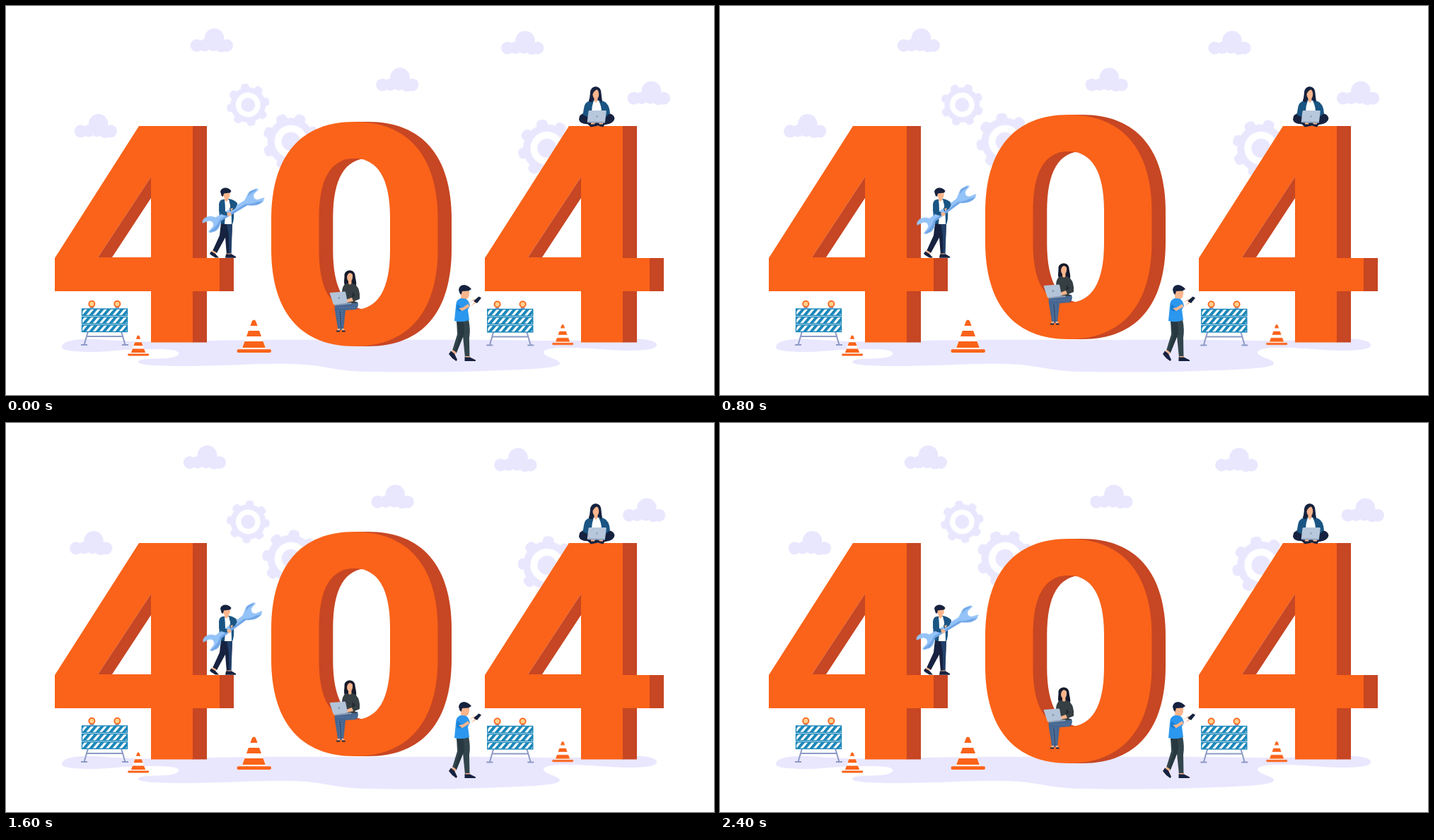
Animation, 1001 px wide and 551 px high, one loop 2.44 s. Source, as an HTML page without scripts:

```html
<!DOCTYPE html>
<html lang="en">
<head>
<meta charset="utf-8">
<title>404</title>
<style>
html, body { margin: 0; width: 100%; height: 100%; overflow: hidden; background: #fff; }
svg { display: block; width: 100%; height: 100%; }
.orange { fill: #fa6319; }
.rust { fill: #c74623; }
.pale { fill: #e9e7fe; }
.navy { fill: #16223f; }
.blue { fill: #1a5583; }
.skin { fill: #fbb58c; }
.white { fill: #fff; }
.move { animation: shift 2440ms linear infinite; }
.turn { animation: spin 2440ms linear infinite; }
.swing { animation: tilt 2440ms linear infinite; transform-origin: 309px 300px; }
@keyframes shift {
  0%, 98.36%, 100% { transform: none; }
  49.18% { transform: translate(var(--x, 0px), var(--y, 0px)); }
}
@keyframes spin {
  0% { transform: rotate(0deg); }
  98.36%, 100% { transform: rotate(var(--a)); }
}
@keyframes tilt {
  0%, 98.36%, 100% { transform: rotate(0deg); }
  49.18% { transform: rotate(-8.5deg); }
}
</style>
</head>
<body>
<svg viewBox="0 0 1001 551" preserveAspectRatio="none">
  <defs>
    <g id="cloud" class="pale">
      <circle cx="269.7" cy="56" r="9"/>
      <circle cx="281" cy="55.5" r="8.7"/>
      <circle cx="294.5" cy="45.6" r="13.8"/>
      <circle cx="293" cy="56" r="8"/>
      <circle cx="304" cy="57" r="8.6"/>
      <circle cx="312" cy="56" r="9"/>
    </g>

    <rect id="tooth" x="-5.8" y="-30.3" width="11.6" height="60.6" rx="4.5"/>
    <g id="gear" class="pale">
      <circle r="25"/>
      <use href="#tooth"/>
      <use href="#tooth" transform="rotate(45)"/>
      <use href="#tooth" transform="rotate(90)"/>
      <use href="#tooth" transform="rotate(135)"/>
      <circle r="17.4" class="white"/>
      <circle r="10"/>
    </g>

    <g id="four">
      <path class="rust" d="M263 170H284V357H263ZM301 357H322V404H301ZM263 403H284V476.500H263Z"/>
      <path class="orange" fill-rule="evenodd" d="M188 170H264V357H302V404H264V476.500H205V404H69V357ZM205 242V356H130Z"/>
      <path class="rust" d="M205 242V272L150 356H130Z"/>
    </g>

    <path id="hole" d="M442.500 300C442.500 245 459 216 492.500 216S543 245 543 300V346C543 401 526 430 492.500 430S442.500 401 442.500 346Z"/>
    <clipPath id="inner"><use href="#hole"/></clipPath>

    <g id="cone">
      <path class="white" d="M347.500 447H353.500L368 486H333Z"/>
      <path class="orange" d="M348 446Q350.500 443 353 446L355.600 453H345.400ZM342.900 460H358.100L361 468H340ZM337.500 475H363.500L366.800 484H334.200Z"/>
      <rect class="orange" x="326.500" y="486.300" width="48.500" height="4.700" rx="2.300"/>
    </g>

    <pattern id="stripes" width="9.300" height="12" patternUnits="userSpaceOnUse" patternTransform="translate(107 428) skewX(-40)">
      <rect width="9.300" height="12" fill="#fff"/>
      <rect width="5.200" height="12" fill="#1b87b9"/>
    </pattern>
    <g id="board">
      <rect x="107.500" y="429" width="64" height="9.400" fill="url(#stripes)" stroke="#1b87b9" stroke-width="1.400"/>
    </g>
    <g id="lamp">
      <path fill="#8d9ac6" d="M118.500 426H124V428.500H118.500Z"/>
      <circle class="orange" cx="121.300" cy="422" r="5"/>
      <circle cx="121.300" cy="422" r="3.200" fill="#fdd08c"/>
    </g>
    <g id="barrier">
      <g fill="none" stroke="#8d9ac6" stroke-width="2">
        <path d="M116 461L110.500 480M163 461L168.500 480M113.500 468H165.500"/>
        <path d="M106 480H115M164 480H173"/>
      </g>
      <use href="#lamp"/>
      <use href="#lamp" x="36"/>
      <use href="#board"/>
      <use href="#board" y="11.500"/>
      <use href="#board" y="23"/>
    </g>
  </defs>

  <path class="pale" d="M79 483C80 474 100 471 125 472C160 474 200 477 260 475C340 472 420 473 500 473C600 473 680 472 760 474C820 475 870 470 900 472C914 473 921 477 920 481C918 487 900 488 880 488C850 488 830 484 790 484C770 484 759 487 760 491C762 498 782 500 783 506C783 513 740 515 690 516.500C630 519 560 519 510 518C470 517 455 511 425 508C370 504 320 510 255 510C215 510 187 509 187 504C188 499 208 500 225 499C238 498 246 495 244 491C241 486 222 486 200 486C160 486 140 491 112 490C92 489 79 488 79 483Z"/>

  <g class="move" style="--x:-15px">
    <use href="#cloud"/>
    <use href="#cloud" x="439.500" y="3.500"/>
  </g>
  <g class="move" style="--x:-10px">
    <use href="#cloud" x="262.500" y="55.700"/>
    <use href="#cloud" x="618" y="74.700"/>
    <use href="#cloud" x="-164" y="121.300"/>
  </g>

  <g transform="translate(342.300 140) rotate(-10)"><use href="#gear" class="turn" style="--a:90deg"/></g>
  <g transform="translate(403 192) rotate(22) scale(1.340)"><use href="#gear" class="turn" style="--a:-90deg"/></g>
  <g transform="translate(765 201.500) rotate(-12) scale(1.360)"><use href="#gear" class="turn" style="--a:90deg"/></g>

  <use href="#four"/>
  <use href="#four" x="608"/>

  <use href="#barrier"/>
  <use href="#barrier" x="573.300" y=".5"/>

  <g class="move" style="--y:-15px">
    <path class="rust" d="M492 164H512C588 164 630 212 630 302V344C630 434 588 482 512 482H492Z"/>
    <path class="orange" d="M375 302C375 212 417 164 492.500 164S610.500 212 610.500 302V344C610.500 434 568 482 492.500 482S375 434 375 344Z"/>
    <use href="#hole" class="rust"/>
    <g clip-path="url(#inner)"><use href="#hole" class="white" x="19.800"/></g>

    <!-- seated woman -->
    <path fill="#161b2c" d="M478.500 381C479 373 492 372 493.500 381C494 387 496 391 495 396L481 397C476 394 479 387 478.500 381Z"/>
    <path fill="#466792" d="M470 421L497 419Q500 426 494 430L480 431L477 459H469.500L465 431Q463 423 470 421Z"/>
    <path fill="none" stroke="#8299b8" stroke-width=".8" stroke-dasharray="1 2" d="M468 427H494M470 432L473 457M475 432L475 457"/>
    <path d="M472 432L474 458" stroke="#2f4468"/>
    <path class="skin" d="M468.500 457H472L472 461H468ZM474.500 457H478L479 461H475Z"/>
    <path class="navy" d="M467.500 459.500H472V461.500H467ZM475 459.500H479L480 461.500H475Z"/>
    <path fill="#363f43" d="M479 394Q486 391 493 394Q499 398 500 408V415L493 418L497 421H477L475 406Q475 398 479 394Z"/>
    <path fill="#242b30" d="M490 405L494 410L489 413Z"/>
    <path class="skin" d="M484 389H488.500V393Q486.500 396 484 393ZM482 380Q486 375 490 380Q491 389 486 391Q481 389 482 380Z"/>
    <path fill="#161b2c" d="M480 383Q482 374 487 375Q493 377 492 384Q490 378 486 378Q482 379 482 386Z"/>
    <path class="skin" d="M489 413L481 416L482 420L491 418Z"/>
    <path fill="#8b9db5" d="M463 422L488 420L489 422L465 424.500Z"/>
    <path fill="#b4c4d8" d="M458.500 406L479 404.500Q480 404.500 480.300 406L483 420.500L464 423Q463 423 462.600 422L457.800 407Q457.500 406 458.500 406Z"/>
    <circle cx="471" cy="413.500" r="1.500" fill="#8499b5"/>
  </g>

  <use href="#cone"/>
  <use href="#cone" transform="translate(-30.300 191) scale(.62)"/>
  <use href="#cone" transform="translate(569.700 175.500) scale(.62)"/>

  <!-- man with wrench -->
  <path class="navy" d="M304 307H320L319 330L318 353H312L310 328L298 350L292 347L302 325Z"/>
  <path fill="#22406a" d="M312 309H320L318.500 352H315.500L315 325Z"/>
  <path class="skin" d="M292 346L297.500 349L296 351.500L290.500 348.500ZM312.500 350.500H318V352.500H312.500Z"/>
  <path class="navy" d="M290 347.500L296 351L301 356.500H296Q290 353 288 351ZM311 351.500H319L325 355V356.700H310Z"/>
  <path class="blue" d="M307 274Q302 274 301 281L302 306Q305 309 309 309H320Q323 303 322 290L326 287L327 279Q322 274 315 273Z"/>
  <path class="white" d="M309 274H315Q319 287 319 309H309Q311 290 309 274Z"/>
  <path class="skin" d="M309 269H314V275L311.500 277L309 275ZM306 264L316.500 264Q317.500 272 312.500 273.500Q307 273 306 264Z"/>
  <path class="navy" d="M303 263Q304 257.500 311 257.500Q316 258 318.500 262L317 264.500L308 265.500L307 269.500H305Z"/>
  <g class="swing">
    <g transform="translate(319 291) rotate(-31)">
      <path fill="#94c3f8" d="M-24 -4.500L22 -4C28 -5 31 -11 38 -11L47 -9.500L49 -7L40 -5Q34 0 40 4.500L50 7L46 10.500C38 13 30 9 24 4L-20 4C-24 8 -28 12 -34 12L-42 10L-43 7.500L-34 5Q-28 0 -34 -5L-44 -7L-42 -10C-36 -14 -28 -11 -24 -4.500Z"/>
      <path fill="#6fa5e6" d="M-20 1L22 1Q30 6 38 7L46 10.500C38 13 30 9 24 4L-20 4C-24 8 -28 12 -34 12L-42 10L-40 8Q-28 8 -20 1ZM38 -11L47 -9.500L44 -7.500L38 -8Q34 -8 31 -6Q34 -11 38 -11Z"/>
    </g>
  </g>
  <path class="blue" d="M302 281L301 290Q303 296 312 297L314 293L308 290V280ZM321 277L327 281L324 287L317 291L316 287Z"/>
  <path class="skin" d="M312 293L317 292L319 296L314 298ZM317 287L321 286L319 291Z"/>

  <!-- woman on top -->
  <path class="navy" d="M826 123C826 112 841 111 841.500 123Q842 130 843.500 137H825Q823 134 825 131Z"/>
  <path class="navy" d="M819 151Q810 153 810 161Q812 168 824 167L848 168Q860 166 860.500 159Q859 152 850 152Z"/>
  <path class="blue" d="M826 134Q818 136 817 145L815.500 154L822 157L826 160H846L849 156L854 152Q853 138 845 135L838 133Z"/>
  <path class="white" d="M831 134H838Q842 142 842 150H828Q828 142 831 134Z"/>
  <path class="skin" d="M831.500 130H836.500V134.500L834 137L831.500 134.500ZM829 121Q834 115 838.500 121Q839 131 834 132.500Q829 131 829 121Z"/>
  <path class="navy" d="M826.500 127Q826 115 834 114.500Q841 115 841 126L842 137L838 132Q840 124 836 118Q831 120 829 126L829.500 136H825Z"/>
  <path class="navy" d="M821 166Q832 164 848 166L844 171.500L837 169.500L827 171.500Z"/>
  <path class="skin" d="M827 165H833L832 167.500H827ZM838 165H844V167.500H839Z"/>
  <path fill="#b8c7db" d="M825 148H847.500Q849 148 848.800 149.500L847 164Q847 165.500 845 165.500L823 165Q821.500 165 821.800 163.500L823.500 149.500Q823.500 148 825 148Z"/>
  <path fill="#8fa3bd" d="M822 163.500L847 164L846.500 165.700L823 165.300Z"/>
  <circle cx="835.500" cy="156.500" r="1.400" fill="#95a9c2"/>

  <!-- man with phone -->
  <path fill="#33454c" d="M637 444H654Q657 458 655 470L655.500 498H649L646 468L636.500 492L631 488L638 465Z"/>
  <path fill="#273840" d="M637 446L646 446Q650 460 646 469L637 491L634 490L641 466Z"/>
  <path class="skin" d="M631.500 487L636.500 490.500L635 494L630 490ZM649.500 496H655.500V499H649.500Z"/>
  <path class="navy" d="M629 488.500L634 492.500L638 501L636.500 503Q630 499 626 493ZM648.500 497.500H656L664 501.500V503H648.500Z"/>
  <path class="skin" d="M643 409H649.500V415Q647 418 643.500 415ZM642 403H655Q656 414 650 415.500Q643 414 642 403Z"/>
  <path class="navy" d="M640 402Q641 395 648 395Q654 396 658 401L654 403.500L645 404L643.500 409L641.500 407Z"/>
  <path fill="#2b97ee" d="M643 414Q636 416 636 425L634 446Q644 449 655 445L653 430L656 425Q655 417 649.500 414.500Z"/>
  <path fill="#177fd4" d="M638 422L646 429L641 433L637 430Z"/>
  <path class="skin" d="M640 428L645 432L657 425L665 420L663 416L656 420L646 427ZM653 422L662 415L666 416L656 426Z"/>
  <path class="navy" d="M661 418L668.500 411.500L672 413.500L666 421Z"/>
</svg>
</body>
</html>
```
